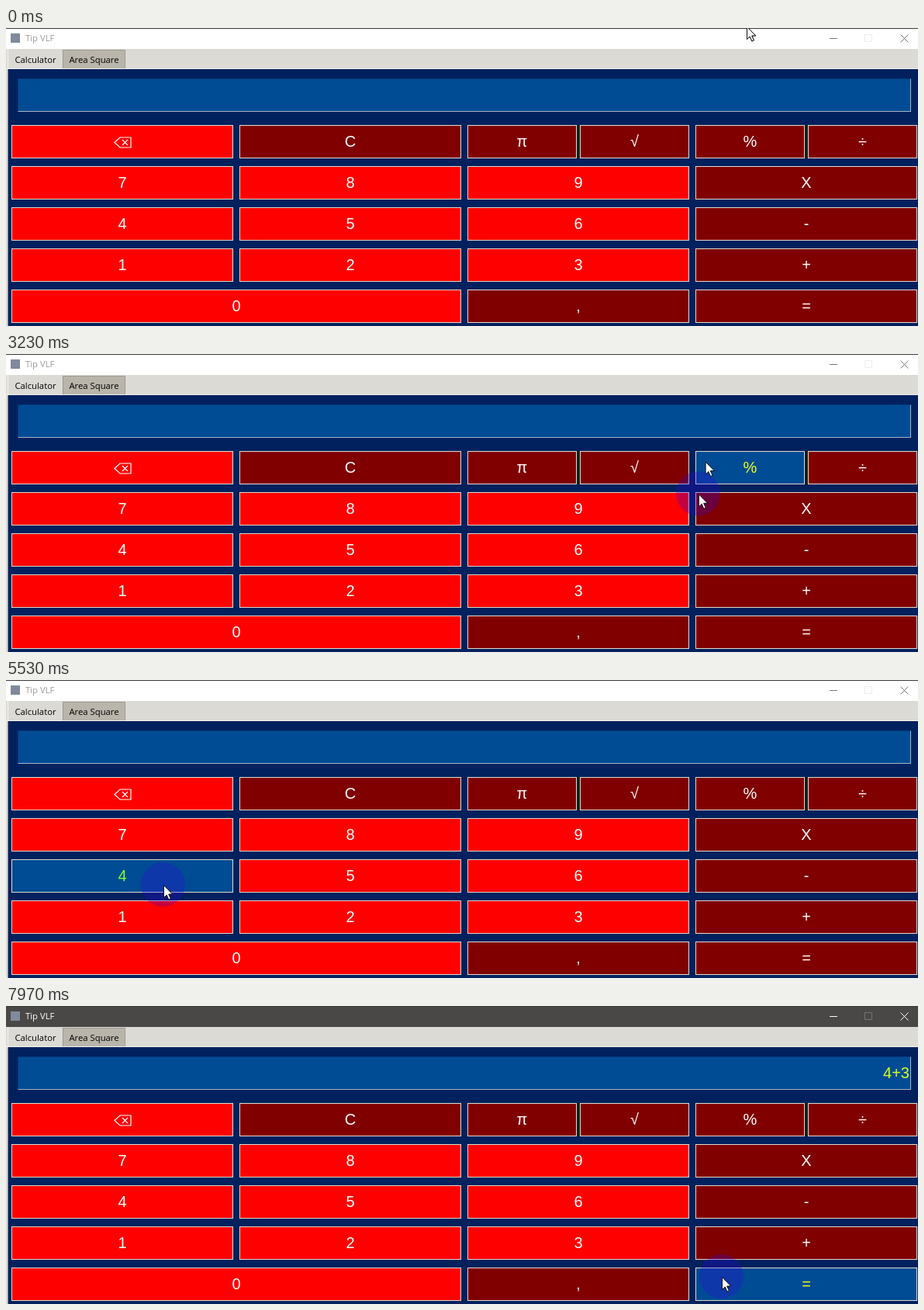
An HTML page that plays this animation: 1176x384 px, repeating every 8000 ms.

```html
<!DOCTYPE html>
<html lang="en">
<head>
<meta charset="utf-8">
<title>Calculator</title>
<style>
  html, body { margin: 0; width: 100%; height: 100%; overflow: hidden; }
  #win {
    position: relative; width: 1176px; height: 384px; overflow: hidden;
    background: #00215e; font: 11.3px "Open Sans", "Noto Sans", sans-serif;
  }
  #win > * { position: absolute; box-sizing: border-box; }
  #bar {
    left: 0; top: 0; width: 1176px; height: 27px; border-top: 1px solid #3c3a3a;
    background: #fff; color: #999; --faint: #ececec; --line: #777;
  }
  #bar.on { background: #4a4747; color: #fff; --faint: #757272; --line: #fff; }
  #bar i { position: absolute; left: 6px; top: 6px; width: 12px; height: 12px; background: #7f8a9c; }
  #bar span { position: absolute; left: 25px; top: 4px; line-height: 16px; }
  #bar svg { position: absolute; left: 1056px; top: 0; }
  #strip {
    left: 0; top: 27px; width: 1176px; height: 26px;
    background: #dcdad5; border-bottom: 1px solid #f4f2ee;
  }
  .tab { text-align: center; color: #000; white-space: nowrap; }
  #tab1 { left: 2px; top: 27px; width: 71px; height: 26px; border-left: 1px solid #f4f2ee; line-height: 27px; }
  #tab2 {
    left: 73px; top: 28px; width: 81px; height: 24px; line-height: 24px;
    background: #bab5ab; border: 1px solid #9e9a91; border-bottom: 0;
  }
  #edge { left: 0; top: 53px; width: 3px; height: 331px; background: #dcdad5; border-right: 1px solid #8e8c88; }
  #out {
    left: 15px; top: 65px; width: 1152px; height: 43px; padding-right: 1px;
    background: #004c94; border: 1px solid #003a78; border-right-color: #a9b4c4; border-bottom-color: #a9b4c4;
    color: #d8ff20; text-align: right; font: 20px/41px "Liberation Sans", Arial, sans-serif;
  }
  .gap { width: 6px; height: 43px; background: #10201c; }
  .key {
    height: 43px; border: 1px solid #e2dccb; background: #f00; color: #fff; text-align: center;
    font: 20px/41px "Liberation Sans", Arial, sans-serif;
  }
  .key.op { background: #800000; }
  .key.hot { background: #004c94; color: #7dff30; }
  .key.op.hot { color: #f4ff20; }
  .key svg { display: block; margin: 14px auto 0; }
  #halo, #ring { left: 0; top: 0; border-radius: 50%; }
  #halo { width: 57px; height: 57px; margin: -29px 0 0 -29px; background: #3200e1; }
  #ring { border: 4px solid #a52a48; }
  .arrow { left: 0; top: 0; overflow: visible; }
</style>
</head>
<body>
<div id="win">
  <div id="bar">
    <i></i><span>Tip VLF</span>
    <svg width="120" height="26" fill="none">
      <path d="M6 12.500h10M97.500 7.500l10 10m0-10l-10 10" stroke="var(--line)"/>
      <path d="M51.500 7.500h9v9h-9z" stroke="var(--faint)"/>
    </svg>
  </div>
  <div id="strip"></div>
  <div id="tab1" class="tab">Calculator</div>
  <div id="tab2" class="tab">Area Square</div>
  <div id="edge"></div>
  <div id="out"></div>
</div>
<script>
const LOOP = 8000, LAG = 100, START = 2630, RIPPLE = 300;
const win = document.getElementById('win');
const bar = document.getElementById('bar');
const out = document.getElementById('out');

function add(html) {
  win.insertAdjacentHTML('beforeend', html);
  return win.lastElementChild;
}

// Keypad on a regular grid; wide and half keys are fractions of the column pitch
const PITCH = 294, ROW = 53.2, H = 43;
const eraser = '<svg width="23" height="15" fill="none" stroke="currentColor" stroke-width="1.2"><path d="M1 7.500l7-6.500h14v13H8zM11 4l7 7m0-7l-7 7"/></svg>';
const keys = [];
function key(label, col, row, w = 286) {
  const x = 7 + Math.floor(PITCH * col), y = Math.floor(125 + ROW * row);
  const op = /\d/.test(label) ? '' : ' op';
  const el = add(`<div class="key${op}" style="left:${x}px;top:${y}px;width:${w}px">${label}</div>`);
  keys.push({ el, x, y, w });
}
key(eraser, 0, 0);
key('C', 1, 0);
['π√', '%÷'].forEach((pair, i) => {
  add(`<div class="gap" style="left:${735 + PITCH * i}px;top:125px"></div>`);
  [...pair].forEach((c, j) => key(c, 2 + i + j * .495, 0, 141));
});
['789X', '456-', '123+'].forEach((line, r) => [...line].forEach((c, i) => key(c, i, r + 1)));
key('0', 0, 4, 286 + PITCH);
key(',', 2, 4);
key('=', 3, 4);

const ring = add('<div id="ring"></div>');
const arrow = () => add('<svg class="arrow" width="12" height="20"><path d="M.5.500v16l3.700-3.500 2.700 6 2.500-1.100-2.700-5.900h5z" fill="#fff" stroke="#111"/></svg>');
const trail = arrow();
const halo = add('<div id="halo"></div>');
const lead = arrow();

// Turning points of the pointer
const path = [];
const go = (t, x, y) => path.push({ t, x, y });
const rest = t => path.push({ ...path[path.length - 1], t });
go(2430, 955, -2);
go(START, 936, -3);
go(3430, 868, 250);
go(3800, 462, 338);
go(3900, 418, 306);
go(4400, 226, 339);
go(4500, 253, 271);
go(4800, 238, 140);
go(5200, 203, 264);
rest(5900);
go(6700, 951, 304);
rest(6800);
go(6970, 866, 299);
go(7120, 835, 292);
rest(7590);
go(7830, 923, 349);
rest(LOOP);

// Each press adds a character shortly after the click
const presses = [{ t: 5700, c: '4' }, { t: 6800, c: '+' }, { t: 7220, c: '3' }];

const slope = (i, k) => path[i + 1] ? (path[i + 1][k] - path[i][k]) / (path[i + 1].t - path[i].t) : 0;
function tangent(i, k) {
  if (!i) return 0;
  const a = slope(i - 1, k), b = slope(i, k);
  return a * b > 0 ? 2 * a * b / (a + b) : 0;
}
// Monotone cubic, so the pointer never overshoots a stop
function at(time) {
  const t = Math.max(time, path[0].t);
  let i = 0;
  while (i < path.length - 2 && t >= path[i + 1].t) i++;
  const a = path[i], b = path[i + 1], d = b.t - a.t, u = (t - a.t) / d, v = 1 - u;
  const mix = k => a[k] * v * v * (1 + 2 * u) + b[k] * u * u * (3 - 2 * u) +
    d * u * v * (tangent(i, k) * v - tangent(i + 1, k) * u);
  return { x: mix('x'), y: mix('y') };
}
const keyAt = ({ x, y }) => keys.find(b => x >= b.x && x < b.x + b.w && y >= b.y && y < b.y + H);
const place = (el, { x, y }) => { el.style.transform = `translate(${x}px,${y}px)`; };

function draw(now) {
  const t = now % LOOP;
  const clock = t < START ? 0 : t;
  const p = at(clock), q = at(clock - LAG);
  const hot = keyAt(q);

  place(lead, p);
  place(halo, p);
  place(trail, q);
  for (const b of keys) b.el.classList.toggle('hot', b === hot);
  halo.style.opacity = .28 * Math.min(1, Math.max(0, p.y / 50));

  const hit = presses.find(c => t >= c.t && t < c.t + RIPPLE);
  ring.style.display = hit ? '' : 'none';
  if (hit) {
    const age = t - hit.t, r = 4 + age * .09, c = at(hit.t);
    ring.style.width = ring.style.height = 2 * r + 'px';
    ring.style.opacity = 1 - age / RIPPLE;
    place(ring, { x: c.x - r, y: c.y - r });
  }

  bar.classList.toggle('on', t >= presses[0].t);
  out.textContent = presses.filter(c => t >= c.t + 90).map(c => c.c).join('');
  requestAnimationFrame(draw);
}
requestAnimationFrame(draw);
</script>
</body>
</html>
```
